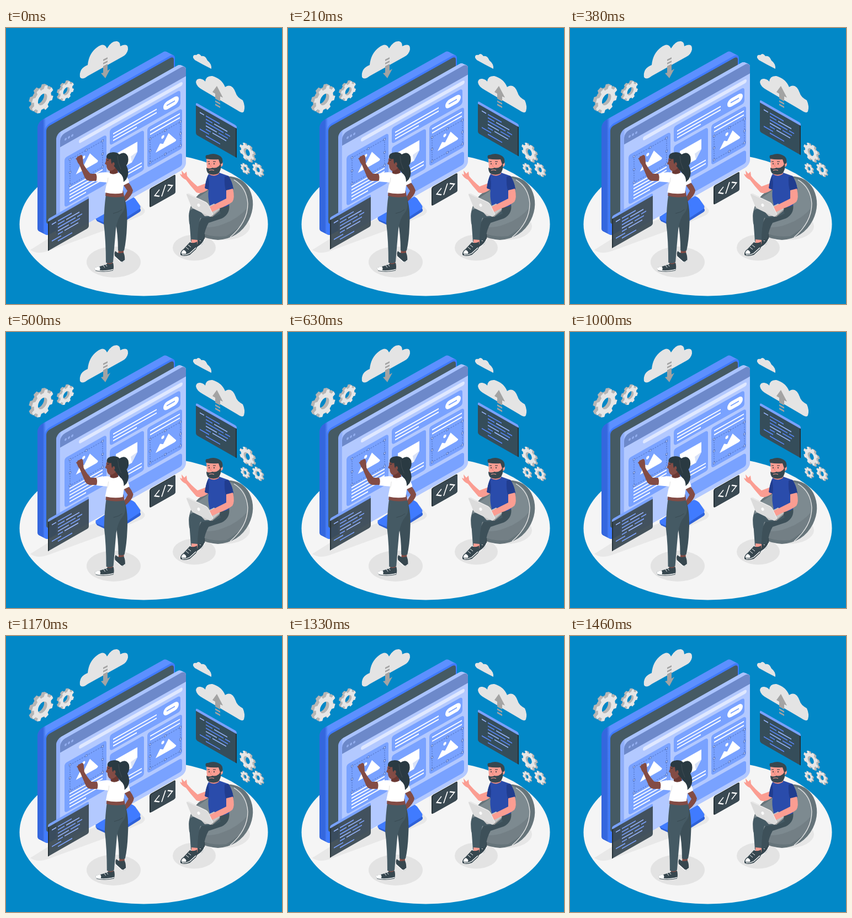
Animation, 500 px wide and 500 px high, one loop 1500 ms. Source, as an HTML page with a canvas:

```html
<!DOCTYPE html>
<html lang="en">
<head>
<meta charset="utf-8">
<title>Building a web page</title>
<style>
  html, body { margin: 0; width: 100%; height: 100%; overflow: hidden; background: #0288c7; }
  canvas { display: block; width: 100vw; height: 100vh; }
</style>
</head>
<body>
<canvas id="stage" width="500" height="500"></canvas>
<script>
const ctx = document.getElementById('stage').getContext('2d');
const LOOP = 1500, STEPS = 36;
const BLUE = '#407bff', CARD = '#79a2ff', PALE = '#b3c9ff';
const SLATE = '#455a64', DARK = '#37474f', INK = '#263238', HAIR = '#2a3a42';
const BROWN = '#834c45', PINK = '#fb9d92';
const SHIRT = '#2a4cab', SLEEVE = '#213d8f';

function fill(d, color, rule = 'nonzero') {
  ctx.fillStyle = color;
  ctx.fill(new Path2D(d), rule);
}

function stroke(d, color, width = 1) {
  ctx.strokeStyle = color;
  ctx.lineWidth = width;
  ctx.stroke(new Path2D(d));
}

function oval(x, y, rx, ry, color, turn = 0) {
  ctx.fillStyle = color;
  ctx.beginPath();
  ctx.ellipse(x, y, rx, ry, turn, 0, Math.PI * 2);
  ctx.fill();
}

function box(x, y, w, h, r, color) {
  ctx.fillStyle = color;
  ctx.beginPath();
  ctx.roundRect(x, y, w, h, r);
  ctx.fill();
}

// Draws on a vertical isometric wall whose horizontal edges have the given slope.
function wall(x, y, slope, draw) {
  ctx.save();
  ctx.transform(1, slope, 0, 1, x, y);
  draw();
  ctx.restore();
}

function shift(x, y, draw) {
  ctx.save();
  ctx.translate(x, y);
  draw();
  ctx.restore();
}

// Thick rounded board: its back sits at the origin, its front at (depth, rise).
function slab(w, h, r, depth, rise, side, top, front) {
  const shade = ctx.createLinearGradient(0, 0, w, 0);
  const edge = (depth + 1) / w;
  shade.addColorStop(0, side);
  shade.addColorStop(edge * 0.7, side);
  shade.addColorStop(edge + 0.005, top);
  shade.addColorStop(1, top);
  for (let i = 0; i <= 1; i += 0.05) box(depth * i, rise * i, w, h, r, shade);
  box(depth, rise, w, h, r, front);
}

function rows(list, color, width) {
  for (const [x1, x2, y] of list) stroke(`M${x1} ${y}H${x2}`, color, width);
}

function drawFloor() {
  ctx.fillStyle = '#0288c7';
  ctx.fillRect(0, 0, 500, 500);
  oval(249.5, 355.5, 225, 130, '#f5f5f5');
  fill('M44 402L76 382L238 314L248 326Q256 332 246 339L205 357L76 404Q56 411 44 402Z', '#e8e8e8');
  oval(195, 424, 49, 28, '#e3e3e3');
  oval(341, 398, 39, 23.5, '#e3e3e3');
  oval(396, 359, 46, 25, '#e6e6e6');
}

function gear(x, y, radius, slope) {
  const teeth = 8, path = new Path2D();
  for (let i = 0; i < teeth; i++) {
    const step = Math.PI * 2 / teeth;
    [[0, 0.78], [0.18, 0.78], [0.27, 1], [0.66, 1], [0.75, 0.78]].forEach(([part, size]) => {
      const a = (i + part) * step;
      path.lineTo(Math.cos(a) * radius * size, Math.sin(a) * radius * size);
    });
  }
  path.closePath();
  path.moveTo(radius * 0.42, 0);
  path.arc(0, 0, radius * 0.42, 0, Math.PI * 2);
  const layer = (offset, color) => {
    ctx.save();
    ctx.transform(0.87, slope * 0.87, 0, 1, x + offset, y + offset * 0.5);
    ctx.fillStyle = color;
    ctx.fill(path, 'evenodd');
    ctx.restore();
  };
  const depth = radius * 0.12;
  for (let i = -1; i < 1; i += 0.2) layer(depth * i * Math.sign(-slope), '#b5b5b5');
  layer(depth * Math.sign(-slope), '#e6e6e6');
}

function drawSky() {
  const cloud = '#e4e4e4', arrow = '#a3a3a3';
  fill('M134 89Q132 73 148 67Q150 46 165 35Q178 25 183 37Q191 23 201 24Q207 25 207 33Q222 26 221 39Q219 48 211 52L148 87Q138 95 134 89Z', cloud);
  fill('M176 57L184 53V56L176 60ZM176 63L184 59V62L176 66ZM176 69L184 65V77L189 74L180 91L172 82L176 81Z', arrow);
  fill('M339 54Q338 48 345 49Q349 44 354 51Q361 49 365 59Q373 65 372 74Q356 66 342 58Z', cloud);
  fill('M344 98Q345 91 352 92Q358 93 361 97Q362 86 374 87Q391 92 397 107Q409 99 416 117Q418 125 429 131Q434 142 431 151Q429 156 419 149L356 112Q345 106 344 98Z', cloud);
  fill('M374 116L382 105L393 126L388 124V133L379 128V119ZM379 131L388 136V139L379 134ZM379 137L388 142V145L379 140Z', arrow);
  gear(63.5, 128, 22.8, -0.57);
  gear(107.5, 113.5, 16, -0.57);
  gear(438, 225.7, 15.3, 0.57);
  gear(433.5, 255, 8.8, 0.57);
  gear(457, 257, 11, 0.57);
}

function drawMonitor() {
  fill('M162 345L218 309Q225 306 233 313L243 327Q246 331 241 334L204 357H180L165 350Z', '#2e61d8');
  fill('M162 342L219 305Q226 302 234 309L243 322Q245 326 240 329L203 353H179L164 347Z', BLUE);
  wall(57, 171, -0.56, () => {
    slab(236, 201, 9, 13, 14, '#3467de', '#5d90ff', BLUE);
    box(16, 18, 231, 177, 6, SLATE);
  });
}

// Selected picture placeholder with dashed outline and resize handles.
function picture(x, y, w, h) {
  const outline = '#4463ad';
  ctx.setLineDash([2.2, 2]);
  stroke(`M${x} ${y}h${w}v${h}h${-w}Z`, outline, 0.7);
  ctx.setLineDash([]);
  for (const i of [0, 0.5, 1]) {
    for (const j of [0, 0.5, 1]) {
      if (i === 0.5 && j === 0.5) continue;
      box(x + w * i - 1.9, y + h * j - 1.9, 3.8, 3.8, 0, outline);
      box(x + w * i - 1.2, y + h * j - 1.2, 2.4, 2.4, 0, '#b9ccff');
    }
  }
  const at = (a, b) => `${x + w * a} ${y + h * b}`;
  fill(`M${at(0.18, 0.71)}L${at(0.33, 0.43)}L${at(0.43, 0.52)}L${at(0.61, 0.2)}L${at(0.86, 0.66)}Q${at(0.86, 0.71)} ${at(0.8, 0.71)}Z`, '#fff');
  oval(x + w * 0.42, y + h * 0.22, 2.7, 2.8, '#fff');
}

function drawBrowser() {
  wall(91, 192, -0.565, () => {
    slab(228, 187, 9, 7, 7, '#8eadfa', '#a9c3ff', PALE);
    box(7, 7, 228, 21, [9, 9, 0, 0], '#6d89ca');
    for (const x of [17, 23, 29]) oval(x, 19, 2, 2.2, '#93aef0');
    box(41, 34, 188, 7, 3.5, '#dfe8ff');

    box(15, 52, 76, 90, 5, CARD);
    box(97, 47, 128, 29, 5, CARD);
    box(97, 82, 62, 73, 5, CARD);
    box(165, 82, 63, 73, 5, CARD);
    box(97, 162, 131, 24, 5, CARD);

    picture(25, 60, 59, 47);
    rows([[24, 84, 112], [24, 84, 118], [24, 84, 124], [24, 84, 130], [24, 54, 136]], '#fff', 2.2);
    rows([[103, 182, 58], [103, 182, 64], [103, 146, 70]], '#fff', 2.2);
    box(194, 54, 28, 15, 7.5, '#fff');
    rows([[200, 215, 61.5]], CARD, 2);

    fill('M108 97H147V115L137 129H108Z', '#fff');
    fill('M147 115L137 129L135 117Z', '#d9e2f7');
    rows([[108, 155, 140], [108, 155, 146]], '#fff', 2.2);
    rows([[170, 224, 90], [170, 224, 97]], '#fff', 2.2);
    picture(170, 105, 55, 43);
  });
}

const codeLines = [
  [7, 15, 14], [18, 43, 14], [18, 30, 20], [33, 57, 20], [18, 50, 26], [53, 62, 26],
  [18, 38, 32], [41, 58, 32], [18, 27, 38], [30, 55, 38], [7, 24, 44], [18, 44, 50]
];

function codePanel(x, y, slope, bright) {
  wall(x, y, slope, () => {
    ctx.globalAlpha = 0.93;
    box(0, 4, 74, 54, [0, 0, 3, 3], '#3a4952');
    ctx.globalAlpha = 1;
    box(0, 0, 74, 5, [3, 3, 0, 0], CARD);
    box(slope < 0 ? 0 : 72, 5, 2, 53, 0, INK);
    codeLines.forEach((line, i) => rows([line], i % 3 ? bright : '#9bb7ff', 1.8));
  });
}

function drawTag() {
  wall(260, 291.5, -0.565, () => {
    box(0, 0, 47, 34, 3, INK);
    box(2, 1.5, 45, 32.5, 3, '#3a4952');
    ctx.lineJoin = 'miter';
    stroke('M18 11.5L9.5 17.5L18 23.5M22 26L29 9M33 11.5L41.5 17.5L33 23.5', '#fff', 2);
  });
}

function drawWoman() {
  // far arm, shoes and ankles
  fill('M213 273Q225 280 230 294Q229 303 216 314L211 310Q216 302 220 295L211 282Z', BROWN);
  fill('M204 399H213V409L203 410Z', BROWN);
  fill('M183 421H193V431L183 432Z', BROWN);
  fill('M198 404Q202 408 206 408L213 407Q216 414 215 422Q211 427 207 423L198 415Q195 409 198 404Z', DARK);
  stroke('M197 414L207 423Q211 426 215 421', '#fff', 1.4);
  fill('M184 427Q190 429 194 425Q196 433 194 439Q178 443 164 440Q160 438 161 434Q175 431 184 427Z', DARK);
  fill('M161 434L169 432Q172 436 169 440L163 439Q160 437 161 434Z', '#fff');
  stroke('M162 438Q166 440 175 440Q187 440 194 437.5', '#fff', 1.4);
  stroke('M162 439.5Q178 443 194 439', DARK, 0.8);
  stroke('M176 430L179 434M180 428L183 432', '#fff', 0.9);

  // trousers
  fill('M196 305L214 306Q221 326 219 360Q218 385 214 403Q208 406 203 403Q203 373 198 350Z', '#3d5059');
  fill('M181 302H213Q219 325 211 334Q202 344 199 364Q196 398 194 424Q188 428 181 425Q181 386 177 353Q178 322 181 302Z', SLATE);
  stroke('M194 336Q204 334 210 329', DARK, 0.8);

  // torso, crop top and raised arm
  fill('M181 294H212L214 305Q197 309 180 304Z', BROWN);
  fill('M186 262L207 262Q221 266 223 280L213 285L211 299Q196 302 179 298L182 283Z', '#fff');
  fill('M132 232Q138 227 139 234L140 246Q146 257 153 264L168 264L169 277L151 277Q144 276 141 267L133 248Q126 240 129 233Z', BROWN);
  stroke('M130 239L127 236', BROWN, 2.4);
  fill('M163 264Q175 260 189 262L185 280L163 278Q166 271 163 264Z', '#fff');
  stroke('M185 271Q185 279 181 286', '#dedede', 0.9);

  // head
  fill('M188 251L200 249L203 262Q195 267 188 263Z', '#6b3933');
  fill('M185 231Q180 237 181 241L179 246L182 248Q182 257 188 259Q199 258 201 246L199 231Z', BROWN);
  fill('M182 235Q181 226 194 225Q202 225 205 229Q216 222 221 233Q223 243 218 249Q225 262 218 274L213 279Q213 268 206 263Q201 257 198 253L191 245L190 237Q186 239 182 235Z', HAIR);
  oval(194.5, 246.5, 2.2, 3.2, BROWN);
  stroke('M183 240L186 239', INK, 1.2);
  stroke('M202 232Q202 244 208 256', '#455057', 0.8);
}

function drawBeanBag() {
  fill('M394 269Q427 266 441 292Q454 319 440 348Q423 381 384 384Q340 380 332 354Q328 328 343 308Q354 294 373 290Z', '#66747a');
  fill('M394 271Q422 270 434 295Q444 326 427 355Q412 374 378 376Q340 373 333 350Q330 328 345 309L373 290Z', '#7d8a90');
  fill('M333 350Q360 369 394 355Q420 346 437 326Q433 358 399 377Q352 382 333 350Z', '#737f85');
  stroke('M413 275Q436 289 438 318Q438 352 406 379', '#e8e8e8', 1.3);
}

function drawMan() {
  // legs and shoes
  fill('M348 376L360 373Q362 384 355 392L347 397Q342 393 345 388Z', DARK);
  stroke('M347 397Q357 391 360 382', '#fff', 1.3);
  stroke('M349 379L355 382M347 383L353 386', '#fff', 0.9);
  fill('M374 319L404 318Q407 337 391 345L367 353Q360 365 358 382L349 386L343 381Q345 358 354 344Z', '#3d5059');
  fill('M335 329Q353 322 382 321L389 336Q374 345 352 344Q347 360 347 386Q342 391 335 387L332 346Q330 333 335 329Z', SLATE);
  fill('M336 383L347 384L347 392L336 394Z', PINK);
  fill('M333 388Q340 391 346 387Q348 395 344 401L333 411Q321 415 316 411Q315 405 322 400Z', DARK);
  fill('M322 402Q317 405 318 409L326 409Q328 405 322 402Z', '#fff');
  stroke('M319 410.5Q326 412 333 408L344 398', '#fff', 1.4);
  stroke('M326 397L331 401M330 393L335 397', '#fff', 1);

  // raised arm
  fill('M366 280L367 292Q354 302 345 298Q334 286 326 275Q317 271 315 264L319 266L318 258L323 264L327 260L328 268Q334 276 347 287Z', PINK);

  // shirt
  fill('M368 263L386 262L403 268Q410 279 412 292L402 296Q406 310 404 321Q390 329 369 321Q365 305 367 292L361 291Q362 272 368 263Z', SHIRT);
  fill('M396 269L403 268Q410 278 412 292Q406 297 399 297Q395 286 396 269Z', SLEEVE);
  fill('M366 267Q369 280 367 293L360 290Q362 275 366 267Z', SLEEVE);
  fill('M368 257H385L386 264Q377 271 368 265Z', '#ee8b82');

  // head
  fill('M363 237Q366 231 384 233L389 241Q395 243 392 250L387 253Q386 262 377 264Q365 265 364 253Z', PINK);
  fill('M363 253Q368 256 374 253Q380 255 386 250L389 245Q391 258 384 264Q374 268 366 263Q363 259 363 253Z', DARK);
  stroke('M368 258Q372 256 377 258', PINK, 1.2);
  fill('M362 236Q360 229 366 230Q377 225 388 232Q394 236 392 245L388 247L385 238Q373 239 363 237Z', DARK);
  oval(368, 246, 0.9, 1.3, INK);
  oval(377, 246, 0.9, 1.3, INK);
  stroke('M365 242L369 242M375 242L380 242', INK, 1);
  stroke('M372 245L370 250L373 251', '#e27c75', 0.8);

  // laptop and resting arm
  fill('M351 331L377 318L388 328L374 340L360 341Z', '#c6c6c6');
  fill('M399 294L411 291Q415 308 410 315Q399 323 386 327L374 333Q366 330 367 325L377 320L399 309Z', PINK);
  fill('M327 302Q327 299 331 300L362 315Q366 317 367 321L375 337Q375 341 370 342L339 327Q336 325 335 322Z', '#dcdcdc');
  stroke('M328 300L362 316Q366 318 367 321L375 338', '#f2f2f2', 1);
  fill('M370 342L375 339L387 329V331L374 342Z', '#999');
  oval(349, 321, 2.5, 3, '#fafafa', -0.4);
}

// Height of the standard CSS "ease" curve, its parameter found by bisection.
function ease(x) {
  let low = 0, high = 1;
  for (let i = 0; i < 20; i++) {
    const s = (low + high) / 2;
    const bx = 0.75 * s * (1 - s) + s ** 3;
    if (bx < x) low = s; else high = s;
  }
  return 0.3 * low * (1 - low) ** 2 + 3 * low ** 2 * (1 - low) + low ** 3;
}

const swayStops = [0, -1, 2, -4, 4, -4, 4, -4, 2, -1, 0];

function sway(phase) {
  const i = Math.floor(phase * 10);
  return swayStops[i] + (swayStops[i + 1] - swayStops[i]) * ease(phase * 10 - i);
}

function render(ms) {
  const phase = Math.floor((ms % LOOP) / LOOP * STEPS + 0.1) % STEPS / STEPS;
  const lift = -10 * (1 - Math.abs(1 - 2 * phase));
  drawFloor();
  drawSky();
  drawMonitor();
  shift(0, lift, () => {
    drawBrowser();
    codePanel(76, 346, -0.57, '#7da3ff');
    drawTag();
    codePanel(344, 135, 0.57, '#5b89fa');
  });
  shift(sway(phase), 0, drawWoman);
  drawBeanBag();
  drawMan();
}

const start = performance.now();
function tick() {
  render(performance.now() - start);
  requestAnimationFrame(tick);
}
tick();
</script>
</body>
</html>
```
